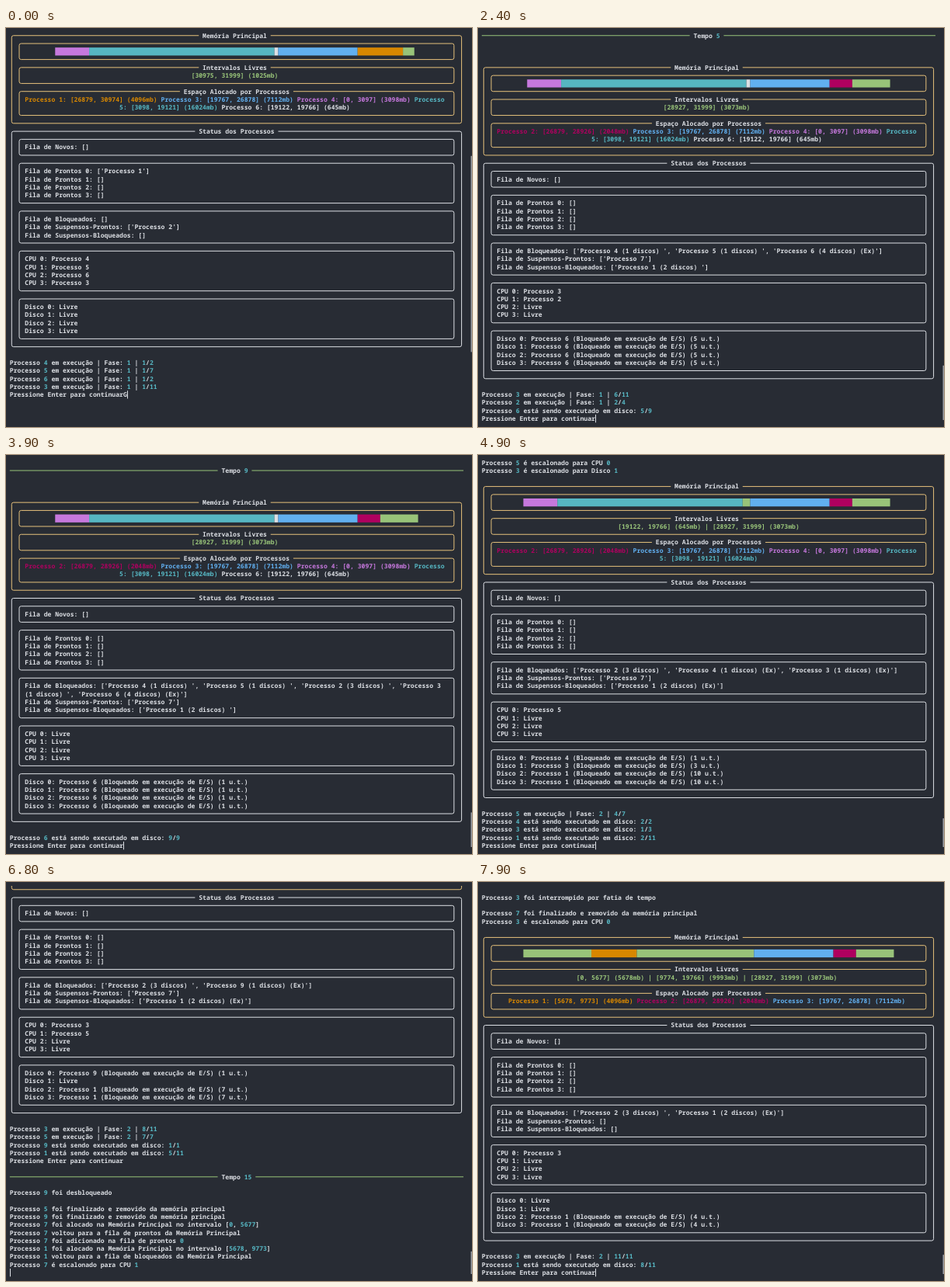
An HTML page with a canvas that plays this animation: 600 px wide and 514 px high, repeating every 8 s.

```html
<!DOCTYPE html>
<html lang="pt">
<head>
<meta charset="utf-8">
<title>Simulador de processos</title>
<style>
html, body { margin: 0; width: 100%; height: 100%; overflow: hidden; background: #282c34; }
canvas { display: block; width: 600px; height: 514px; }
</style>
</head>
<body>
<canvas id="term"></canvas>
<script>
const FG = '#dcdfe4', BG = '#282c34', GOLD = '#e5c07b', GREEN = '#98c379', CYAN = '#56b6c2';
const COLORS = { 1: '#d78700', 2: '#af005f', 3: '#61afef', 4: '#c678dd', 5: CYAN, 6: FG, 7: GOLD, 9: '#c678dd' };
const LOOP = 8000, STEP = 100, LAST = 17;

// ---- Scheduler simulation ----
const MEMORY = 32000, QUANTUM = 3;
const proc = (id, size, cpu1, cpu2, io = 0, disks = 0, at = 0) =>
  ({ id, size, cpu1, cpu2, io, disks, at, base: -1, phase: 1, done: 0, ioDone: 0, slice: 0 });
const procs = [
  proc(4, 3098, 2, 0, 2, 1), proc(5, 16024, 3, 4, 1, 1), proc(6, 645, 1, 1, 9, 4), proc(3, 7112, 7, 4, 3, 1),
  proc(1, 4096, 3, 4, 11, 2), proc(2, 2048, 2, 2, 4, 3), proc(7, 5678, 2, 0, 0, 0, 1), proc(9, 2500, 2, 0, 1, 1, 12)
];
const cpu = Array(4).fill(null), disk = Array(4).fill(null), ready = [];
let blocked = [], suspended = [];

const loaded = () => procs.filter(p => p.base >= 0).sort((a, b) => a.base - b.base);
const onDisk = () => [...new Set(disk)].filter(Boolean);

// First fit
function place(p) {
  let pos = 0;
  for (const q of loaded()) {
    if (q.base - pos >= p.size) break;
    pos = q.base + q.size;
  }
  if (pos + p.size <= MEMORY) p.base = pos;
  return p.base >= 0;
}

function tick(t) {
  const pre = [], msgs = [];
  const finish = p => {
    p.base = -1;
    msgs.push(`${p.id} foi finalizado e removido da memória principal`);
  };
  const allocated = p =>
    msgs.push(`${p.id} foi alocado na Memória Principal no intervalo [${p.base}, ${p.base + p.size - 1}]`);
  const enqueue = p => {
    ready.push(p);
    msgs.push(`${p.id} foi adicionado na fila de prontos 0`);
  };

  cpu.forEach((p, i) => {
    if (!p || p.done < p.cpu1 + (p.phase > 1 ? p.cpu2 : 0)) return;
    cpu[i] = null;
    if (p.phase > 1 || !p.io) return finish(p);
    blocked.push(p);
    pre.push(`${p.id} foi bloqueado`);
  });
  for (const p of onDisk().filter(p => p.ioDone === p.io)) {
    disk.forEach((q, i) => { if (q === p) disk[i] = null; });
    blocked = blocked.filter(q => q !== p);
    p.phase = 2;
    pre.push(`${p.id} foi desbloqueado`);
    if (p.cpu2) ready.push(p);
    else finish(p);
  }
  cpu.forEach((p, i) => {
    if (!p || p.slice < QUANTUM) return;
    cpu[i] = null;
    ready.push(p);
    pre.push(`${p.id} foi interrompido por fatia de tempo`);
  });

  for (const p of procs.filter(p => p.at === t)) {
    msgs.push(`${p.id} foi adicionado na fila de novos`);
    if (place(p)) {
      allocated(p);
      enqueue(p);
    } else {
      suspended.push(p);
      msgs.push(`${p.id} não foi alocado na Memória Principal`, `${p.id} foi adicionado na fila de suspensos-prontos`);
    }
  }
  // The topmost process is swapped out when it only waits and its room helps a suspended one.
  const top = loaded().pop();
  if (blocked.includes(top) && !disk.includes(top) && suspended.some(p => p.size <= MEMORY - top.base)) {
    top.base = -1;
    msgs.push(`${top.id} foi adicionado na fila de suspensos-bloqueados`);
  }
  suspended = suspended.filter(p => {
    if (!place(p)) return true;
    allocated(p);
    msgs.push(`${p.id} voltou para a fila de prontos da Memória Principal`);
    enqueue(p);
  });
  for (const p of blocked.filter(p => p.base < 0 && place(p))) {
    allocated(p);
    msgs.push(`${p.id} voltou para a fila de bloqueados da Memória Principal`);
  }

  cpu.forEach((p, i) => {
    if (p || !ready.length) return;
    cpu[i] = ready.shift();
    cpu[i].slice = 0;
    msgs.push(`${cpu[i].id} é escalonado para CPU ${i}`);
  });
  for (const p of blocked.filter(p => !disk.includes(p))) {
    const free = [...disk.keys()].filter(i => !disk[i]);
    if (free.length < p.disks) continue;
    for (const i of free.slice(0, p.disks)) {
      disk[i] = p;
      msgs.push(`${p.id} é escalonado para Disco ${i}`);
    }
  }
  for (const p of cpu.filter(Boolean)) {
    p.done++;
    p.slice++;
  }
  for (const p of onDisk()) p.ioDone++;
  return { pre, msgs };
}

// ---- Text layout: a line is a list of [character, colour] cells ----
const COLS = 120, INNER = COLS - 4, TEXT = INNER - 4;
const cells = (s, color = FG) => [...s].map(c => [c, color]);
const numbered = s => s.split(/(\d+)/).flatMap((p, i) => cells(p, i % 2 ? CYAN : FG));
const pad = n => cells(' '.repeat(Math.max(0, n)));
const blank = [];

function wrap(line, width) {
  const out = [];
  while (line.length > width) {
    let i = width;
    while (line[i][0] !== ' ') i--;
    out.push(line.slice(0, i));
    line = line.slice(i + 1);
  }
  return [...out, line];
}
const center = line => [...pad(Math.floor((TEXT - line.length) / 2)), ...line];

function box(lines, width, color = FG, title = '') {
  const t = title && ` ${title} `;
  const left = Math.floor((width - 4 - t.length) / 2) + 1;
  const dash = n => cells('─'.repeat(n), color);
  const side = cells('│', color);
  return [
    [...cells('╭', color), ...dash(left), ...cells(t), ...dash(width - 2 - left - t.length), ...cells('╮', color)],
    ...lines.map(l => [...side, ...pad(1), ...l, ...pad(width - 3 - l.length), ...side]),
    [...cells('╰', color), ...dash(width - 2), ...cells('╯', color)]
  ];
}
const textBox = rows => box(rows.flatMap(r => wrap(cells(r), TEXT)), INNER);

function memoryPanel() {
  const parts = [];
  let pos = 0;
  for (const p of [...loaded(), { base: MEMORY }]) {
    if (p.base > pos) parts.push({ base: pos, size: p.base - pos });
    if (p.id) parts.push(p);
    pos = p.base + p.size;
  }
  const bar = parts.flatMap(({ id, size }) => id
    ? cells('█'.repeat(Math.floor(size / 325)), COLORS[id])
    : cells('█'.repeat(Math.round(size / 320)), GREEN));
  const range = ({ base, size }) => `[${base}, ${base + size - 1}] (${size}mb)`;
  const free = parts.filter(p => !p.id).map(range).join(' | ');
  const list = loaded().sort((a, b) => a.id - b.id).flatMap((p, i) =>
    cells(`${i ? ' ' : ''}Processo ${p.id}: ${range(p)}`, COLORS[p.id]));
  return box([
    ...box([center(bar)], INNER, GOLD),
    ...box([center(cells(free, GREEN))], INNER, GOLD, 'Intervalos Livres'),
    ...box(wrap(list, TEXT).map(center), INNER, GOLD, 'Espaço Alocado por Processos')
  ], COLS, GOLD, 'Memória Principal');
}

const names = (list, label = p => p.id) => '[' + list.map(p => `'Processo ${label(p)}'`).join(', ') + ']';
function statusPanel() {
  const needs = p => `${p.id} (${p.disks} discos) ${disk.includes(p) ? '(Ex)' : ''}`;
  const inside = blocked.filter(p => p.base >= 0);
  const waitingFirst = [...inside.filter(p => !disk.includes(p)), ...inside.filter(p => disk.includes(p))];
  return box([
    ...textBox(['Fila de Novos: []']),
    ...textBox([ready, [], [], []].map((q, i) => `Fila de Prontos ${i}: ${names(q)}`)),
    ...textBox([
      'Fila de Bloqueados: ' + names(waitingFirst, needs),
      'Fila de Suspensos-Prontos: ' + names(suspended),
      'Fila de Suspensos-Bloqueados: ' + names(blocked.filter(p => p.base < 0), needs)
    ]),
    ...textBox(cpu.map((p, i) => `CPU ${i}: ${p ? 'Processo ' + p.id : 'Livre'}`)),
    ...textBox(disk.map((p, i) => `Disco ${i}: ` +
      (p ? `Processo ${p.id} (Bloqueado em execução de E/S) (${p.io - p.ioDone + 1} u.t.)` : 'Livre')))
  ], COLS, FG, 'Status dos Processos');
}

function rule(t) {
  const title = `Tempo ${t}`;
  const dash = n => cells('─'.repeat(n), GREEN);
  return [...dash(55), ...pad(1), ...numbered(title), ...pad(1), ...dash(COLS - 57 - title.length)];
}
const say = list => list.map(m => numbered('Processo ' + m));

// Earlier scrollback, and empty lines below the first prompt
const HISTORY = 31, SPARE = 20;

function block(t) {
  const { pre, msgs } = tick(t);
  const head = t
    ? [blank, rule(t), blank, ...say(pre), blank, ...say(msgs)]
    : Array(HISTORY).fill(blank);
  const lines = [
    ...head, ...(t ? [blank] : []), ...memoryPanel(), ...statusPanel(), blank,
    ...say(cpu.filter(Boolean).map(p => `${p.id} em execução | Fase: ${p.phase} | ${p.done}/${p.cpu1 + p.cpu2}`)),
    ...say(onDisk().map(p => `${p.id} está sendo executado em disco: ${p.ioDone}/${p.io}`)),
    cells('Pressione Enter para continuar' + (t ? '' : 'G'))
  ];
  return { head: head.length, notes: pre.length + msgs.length, lines };
}
const blocks = Array.from({ length: LAST + 1 }, (_, t) => block(t));

// ---- Timing: a slow first unit, a quick burst, then one key press every 500 ms ----
const BURST = 2, STEADY = 7;
function start(t) {
  if (t < BURST) return 900 * t;
  if (t < STEADY) return 1600 + 150 * t;
  return 500 * t - 700 + (blocks[t].notes ? 0 : STEP);
}
function stepCount(t) {
  const { notes } = blocks[t];
  if (t === 1) return notes + 1;
  if (t < STEADY || !notes) return 1;
  return notes > 4 ? 3 : 2;
}
function printed(t, step) {
  const { head, notes, lines } = blocks[t], last = stepCount(t) - 1;
  if (step >= last) return lines.length;
  if (t === 1) return head - notes + 1 + step;
  return Math.round(head + (lines.length - head) * step / last);
}

// ---- Drawing ----
const ROWS = 49, CELL_W = 4.868, CELL_H = 10.28, LEFT = 4.85, TOP = 4.6;
const canvas = document.getElementById('term'), ctx = canvas.getContext('2d');
const dpr = window.devicePixelRatio || 1;
canvas.width = 600 * dpr;
canvas.height = 514 * dpr;
ctx.scale(dpr, dpr);
const X = c => LEFT + c * CELL_W, Y = r => TOP + r * CELL_H;
const CORNERS = { '╭': [1, 1], '╮': [-1, 1], '╰': [1, -1], '╯': [-1, -1] };

function drawRun(ch, color, c, r, n) {
  const x = X(c), w = n * CELL_W, mx = X(c + .5), my = Y(r + .5);
  ctx.fillStyle = ctx.strokeStyle = color;
  if (ch === '█') ctx.fillRect(x, Y(r), w, CELL_H);
  else if (ch === '─') ctx.fillRect(x, my - .5, w, 1);
  else if (ch === '│') {
    const y = Math.round(Y(r));
    ctx.fillRect(mx - .5, y, 1, Math.round(Y(r + 1)) - y);
  } else if (CORNERS[ch]) {
    const [dx, dy] = CORNERS[ch];
    ctx.beginPath();
    ctx.moveTo(mx + dx * CELL_W / 2, my);
    ctx.arcTo(mx, my, mx, my + dy * 3, 2.4);
    ctx.lineTo(mx, Math.round(Y(dy > 0 ? r + 1 : r)));
    ctx.stroke();
  } else if (ch !== ' ') {
    for (let i = 0; i < n; i++) ctx.fillText(ch, X(c + i), my + 2.8);
  }
}

function drawLine(line, r) {
  for (let c = 0, n; c < line.length; c += n) {
    const [ch, color] = line[c];
    n = 1;
    while (c + n < line.length && line[c + n][0] === ch && line[c + n][1] === color) n++;
    drawRun(ch, color, c, r, n);
  }
}

function draw(t, step, caretOn) {
  const count = printed(t, step);
  const lines = blocks[t].lines.slice(0, count);
  if (count < blocks[t].lines.length) lines.push(blank);
  const before = blocks.slice(0, t).flatMap(b => b.lines);
  const text = [...before, ...lines];
  const total = Math.max(text.length, blocks[0].lines.length + SPARE);
  const first = t ? total - ROWS : HISTORY;
  const view = text.slice(first, first + ROWS);

  ctx.fillStyle = BG;
  ctx.fillRect(0, 0, 600, 514);
  ctx.font = '600 8.117px "Noto Sans Mono", "DejaVu Sans Mono", monospace';
  ctx.textRendering = 'geometricPrecision';
  ctx.lineWidth = 1;
  view.forEach(drawLine);

  if (caretOn) {
    ctx.fillStyle = FG;
    ctx.fillRect(Math.round(X(view[view.length - 1].length)), Y(view.length - 1), 1, CELL_H);
  }
  const unit = 500 / total;
  ctx.fillStyle = '#9a9da3';
  ctx.fillRect(598.5, 5 + first * unit, 1.5, ROWS * unit);
}

let shown = '';
function frame(now) {
  const ms = now % LOOP;
  let t = LAST;
  while (start(t) > ms) t--;
  const step = Math.min(Math.floor((ms - start(t)) / STEP), stepCount(t) - 1);
  const caretOn = t > 0 || ms < 300;
  const key = [t, step, caretOn].join();
  if (key !== shown) {
    shown = key;
    draw(t, step, caretOn);
  }
  requestAnimationFrame(frame);
}
requestAnimationFrame(frame);
</script>
</body>
</html>
```
